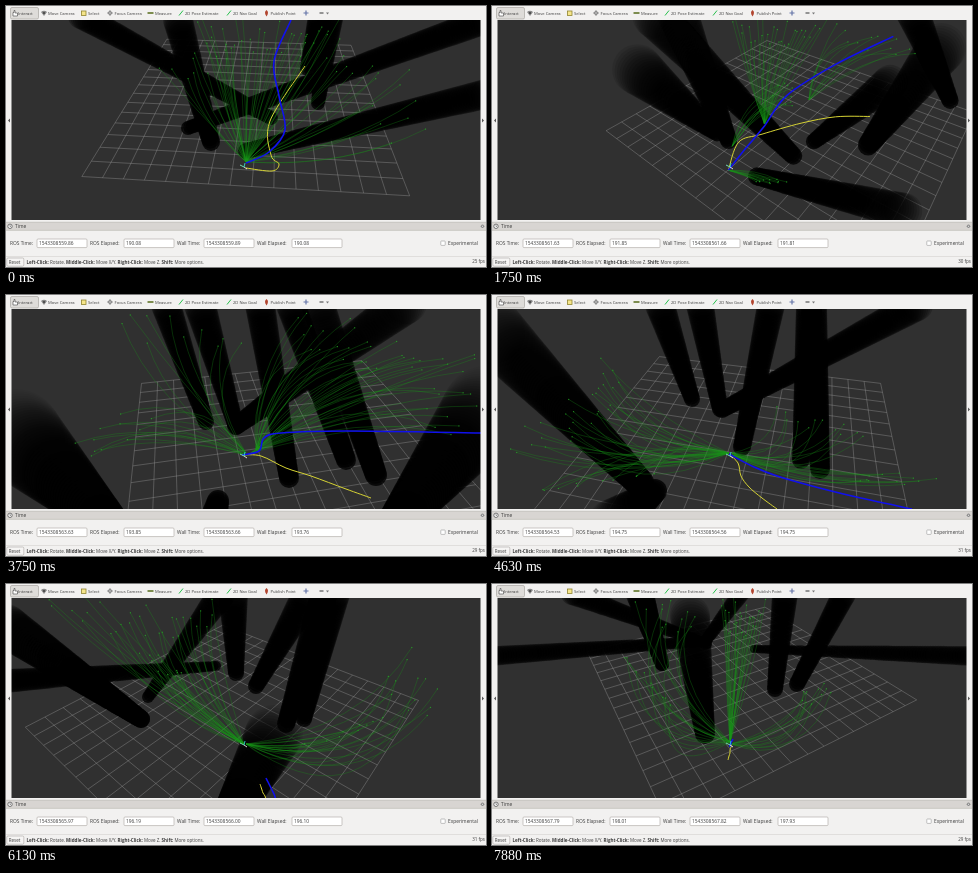
Animation, 480 px wide and 261 px high, one loop 8010 ms. Source, as an HTML page with a canvas:

```html
<!DOCTYPE html>
<html lang="en">
<head>
<meta charset="utf-8">
<title>Planner view</title>
<style>
html, body { margin: 0; width: 100%; height: 100%; overflow: hidden; background: #f2f1f0; }
canvas, svg { position: absolute; left: 0; top: 0; width: 100vw; height: 100vh; display: block; }
text { font-family: "Open Sans", "Noto Sans", sans-serif; font-size: 4.85px; fill: #3c3c3c; }
.tool text { font-size: 4.15px; }
.status text { font-size: 4.5px; }
.bold { font-weight: 700; }
</style>
</head>
<body>
<canvas id="view"></canvas>
<svg id="ui" viewBox="0 0 480 261" preserveAspectRatio="none">
  <path fill="#f2f1f0" d="M0 0H480V14H0ZM0 14H5.5V214H0ZM474.5 14H480V214H474.5ZM0 214H480V261H0Z"/>
  <path fill="#555" d="M4 112.500V116.500L2 114.500ZM476 112.500V116.500L478 114.500Z"/>
  <g class="tool">
    <rect x="4.500" y="1.500" width="28" height="11.500" rx="1.500" fill="#dedcd9" stroke="#aaa7a3" stroke-width=".7"/>
    <path d="M7 10V6.500H8V4.500H9V7H11.500V10Z" fill="#fff" stroke="#444" stroke-width=".6"/>
    <path d="M35 6Q38 3.500 41 6L38 10Z" fill="#888"/><circle cx="38" cy="7" r="1.100" fill="#444"/>
    <rect x="75.500" y="5" width="4.500" height="4.500" fill="#f5e58a" stroke="#8f8430" stroke-width=".8"/>
    <path d="M104 4V10M101 7H107" stroke="#777" stroke-width=".7"/><circle cx="104" cy="7" r="1.700" fill="none" stroke="#777" stroke-width=".7"/>
    <path d="M141.500 7H147.500" stroke="#7c8c4e" stroke-width="2"/>
    <path d="M173 9.500L177 4.500M221 9.500L225 4.500" stroke="#26c04c" stroke-width="1"/>
    <path d="M260.500 10.500Q257.500 6 260.500 4Q263.500 6 260.500 10.500" fill="#b2452f"/>
    <path d="M300 4.500V9.500M297.500 7H302.500" stroke="#6475a8" stroke-width="1.200"/>
    <path d="M313.500 7H317.500" stroke="#555" stroke-width="1.200"/>
    <path d="M320 6.500H323L321.500 8.500Z" fill="#777"/>
    <text x="12" y="8.700">Interact</text><text x="42" y="8.700">Move Camera</text>
    <text x="82" y="8.700">Select</text><text x="108.500" y="8.700">Focus Camera</text>
    <text x="149" y="8.700">Measure</text><text x="179" y="8.700">2D Pose Estimate</text>
    <text x="227" y="8.700">2D Nav Goal</text><text x="264.500" y="8.700">Publish Point</text>
  </g>
  <rect x="0" y="216" width="480" height="8.500" fill="#d8d5d2"/>
  <path d="M0 216.200H480M0 224.300H480" stroke="#bbb7b3" stroke-width=".6"/>
  <circle cx="4" cy="220.300" r="2.200" fill="#f8f8f8" stroke="#444" stroke-width=".7"/>
  <path d="M4 218.900V220.500H5" fill="none" stroke="#444" stroke-width=".5"/>
  <text x="9" y="222.200">Time</text>
  <circle cx="476.500" cy="220.300" r="1.800" fill="#888"/>
  <path d="M475.700 219.500L477.300 221.100M477.300 219.500L475.700 221.100" stroke="#fff" stroke-width=".5"/>
  <g id="fields"></g>
  <rect x="434.800" y="235" width="4.400" height="4.400" rx=".6" fill="#fff" stroke="#999" stroke-width=".6"/>
  <text x="442" y="239.200">Experimental</text>
  <path d="M0 250.500H480" stroke="#d5d2cf" stroke-width=".6"/>
  <g class="status">
    <rect x=".8" y="252" width="17" height="8.200" rx="1.200" fill="#f6f5f4" stroke="#aaa7a3" stroke-width=".6"/>
    <text x="2.800" y="257.800">Reset</text>
    <text x="20.500" y="257.800"><tspan class="bold">Left-Click:</tspan> Rotate. <tspan class="bold">Middle-Click:</tspan> Move X/Y. <tspan class="bold">Right-Click:</tspan> Move Z. <tspan class="bold">Shift:</tspan> More options.</text>
    <text id="fps" x="479" y="257.300" text-anchor="end"></text>
  </g>
</svg>
<script>
const LOOP = 8010, STEP = 125, LAST = 63;
const canvas = document.getElementById("view"), ctx = canvas.getContext("2d");
const fpsText = document.getElementById("fps");
const poses = [];

// grid: centre x, centre depth, turn in degrees
// poles: foot x, y, radius, far end x, y, radius
// fans: start, first tip, last tip, bend
function pose(at, clock, fps, grid, poles, fans, blue, yellow) {
  poses.push({ at, fps, data: { clock, grid, poles, fans, blue, yellow } });
}

pose(0, [559.86, 190.08, 559.89, 190.08], 25, [.019, 1.77, 4.3], [
  205,136,9, 172,14,15,  265,112,7, 75,10,13,  240,145,8, 480,88,15,
  312,97,7, 325,8,13,  182,122,7, 480,14,14,  302,62,8, 314,10,12,
  -40,100,8, -200,90,20,  -60,60,8, -200,20,14,  -60,180,10, -200,120,20
], [
  240,156,185,8,340,8,0,  240,156,150,60,230,20,-10,
  240,156,380,40,440,130,15,  240,156,300,14,380,40,10
], [240,157, 263,146, 279,124, 273,90, 268,55, 285,14],
   [240,162, 266,165, 273,158, 265,149, 264,115, 299,60]);

pose(9, [561.01, 191.23, 561.02, 191.23], 30, [.227, 1.711, 26.4], [
  223,134,9, 196,10,21,  265,118,8, 100,10,20,  280,169,9, 480,186,17,
  358,105,9, 420,10,22,  250,125,7, 480,131,14,  500,50,8, 520,0,14,
  225,112,8, 0,108,23,  -60,60,8, -200,20,14,  -60,180,10, -200,120,20
], [
  247,118,215,10,310,10,-8,  247,118,340,20,437,68,-35,
  240,162,370,200,410,170,-12,  247,118,150,14,210,14,-20
], [240,162, 246,140, 248,117, 270,78, 300,45, 340,14],
   [240,162, 248,118, 270,105, 300,84, 330,74, 357,75]);

pose(20, [562.38, 192.60, 562.42, 192.51], 25, [.257, 1.433, 57.5], [
  253,135,8, 175,10,20,  345,188,10, 237,10,24,  247,172,9, 330,228,20,
  398,180,12, 485,80,28,  408,148,9, 300,10,21,  408,148,9, 300,10,21,
  225,146,8, 320,10,28,  -60,60,8, -200,20,14,  -60,220,20, -200,120,45
], [
  303,118,262,10,375,10,0,  401,65,350,10,450,10,0,
  232,167,140,150,175,185,10,  232,167,455,140,450,175,-8
], [232,167, 262,146, 300,126, 325,103, 395,75, 475,50],
   [232,167, 245,158, 270,156, 320,157, 360,155, 403,153]);

pose(30, [563.63, 193.85, 563.66, 193.76], 29, [.14, 1.369, 79.1], [
  200,127,8, 160,10,15,  283,183,10, 254,10,15,  212,206,11, 205,235,16,
  385,235,18, 480,115,44,  370,180,11, 312,10,17,  340,165,10, 285,10,15,
  230,131,9, 400,8,21,  230,132,8, 194,10,16,  110,235,18, 10,140,46
], [
  250,155,290,14,475,60,-25,  245,158,475,60,475,140,-30,
  240,160,60,165,110,110,30,  240,158,90,14,235,14,-25
], [236,160, 253,156, 258,143, 275,138, 340,136, 476,138],
   [236,160, 255,161, 280,173, 305,181, 340,194, 365,203]);

pose(37, [564.53, 194.75, 564.56, 194.75], 31, [.023, 1.392, 103.1], [
  200,104,8, 168,10,15,  250,152,9, 279,10,14,  163,196,12, 120,228,24,
  330,270,20, 420,330,40,  328,174,10, 322,10,13,  309,165,9, 317,10,13,
  230,115,8, 425,10,16,  228,114,8, 208,10,14,  148,188,14, 0,35,32
], [
  237,158,10,160,110,60,-30,  240,158,285,110,395,140,40,
  240,160,380,190,470,185,15,  237,158,20,200,140,185,25
], [237,159, 262,172, 285,181, 320,191, 360,201, 420,214],
   [237,159, 246,168, 249,181, 257,192, 270,203, 285,214]);

pose(49, [565.97, 196.19, 566, 196.10], 31, [-.056, 1.505, 129.1], [
  230,89,8, 227,10,15,  280,140,9, 318,10,14,  135,135,9, 0,42,22,
  228,225,19, 268,150,29,  298,135,8, 330,10,14,  210,82,5, 0,97,12,
  250,102,8, 302,10,16,  142,113,6, 215,10,14,  135,135,9, 0,42,22
], [
  238,160,30,14,210,14,-18,  240,160,410,60,450,130,70,
  238,160,170,80,120,60,-15,  240,160,300,165,420,125,20
], [260,194, 262,198, 264,202, 266,206, 268,210, 270,216],
   [254,200, 255,203, 256,206, 257,209, 259,212, 260,216]);

pose(63, [567.79, 198.01, 567.82, 197.93], 29, [.01, 1.758, 149.5], [
  283,105,8, 293,10,13,  305,100,8, 352,10,12,  170,80,7, 148,10,14,
  213,150,10, 198,32,20,  262,65,4, 480,72,10,  215,60,5, 80,10,11,
  215,55,6, 250,8,9,  215,57,5, 0,72,10,  170,80,7, 148,10,14
], [
  238,158,228,14,275,14,0,  238,158,140,14,200,14,-60,
  238,160,320,100,350,105,35,  238,158,120,60,160,110,-45
], [238,163, 238,161, 239,160, 239,158, 240,157, 241,155],
   [239,160, 239,163, 238,166, 238,169, 237,172, 236,176]);

const mix = (a, b, u) => a + (b - a) * u;
const rnd = i => { const v = Math.sin(i * 127.1 + 11.7) * 43758.5453; return v - Math.floor(v); };

function poseAt(n) {
  let i = 0;
  while (i < poses.length - 2 && poses[i + 1].at <= n) i++;
  const a = poses[i], b = poses[i + 1], u = (n - a.at) / (b.at - a.at), out = {};
  for (const k in a.data) out[k] = a.data[k].map((v, j) => mix(v, b.data[k][j], u));
  out.fps = u < 1 ? a.fps : b.fps;
  return out;
}

// Ground plane to screen, with the camera at a fixed pitch
function project(x, z) {
  const s = 415.6 / z;
  return [241 + x * s * 1.006, s - 147];
}

function drawGrid([cx, cz, deg]) {
  const cells = 15, c = Math.cos(deg * Math.PI / 180), s = Math.sin(deg * Math.PI / 180);
  const spot = (u, v) => project(cx + u * c + v * s, cz - u * s + v * c);
  ctx.beginPath();
  for (let i = 0; i <= cells; i++) {
    const k = i / cells - .5;
    ctx.moveTo(...spot(k, -.5)); ctx.lineTo(...spot(k, .5));
    ctx.moveTo(...spot(-.5, k)); ctx.lineTo(...spot(.5, k));
  }
  ctx.strokeStyle = "rgba(165,165,165,.55)";
  ctx.lineWidth = .65;
  ctx.stroke();
}

// A pole is a stack of discs that fade as they near the camera
function drawPole([x0, y0, r0, x1, y1, r1]) {
  const count = Math.ceil(Math.hypot(x1 - x0, y1 - y0) / 2.6);
  const far = .32 * Math.min(1, Math.pow(12 / r1, 1.6));
  for (let i = count; i >= 0; i--) {
    const u = i / count;
    ctx.fillStyle = `rgba(0,0,0,${mix(.8, far, Math.sqrt(u))})`;
    ctx.beginPath();
    ctx.arc(mix(x0, x1, u), mix(y0, y1, u), mix(r0, r1, u), 0, 7);
    ctx.fill();
  }
}

function drawFan([x, y, ax, ay, bx, by, bend], count, seed) {
  ctx.strokeStyle = "rgba(24,150,24,.55)";
  ctx.fillStyle = "rgba(40,180,40,.7)";
  ctx.lineWidth = .55;
  for (let i = 0; i < count; i++) {
    const r = rnd(seed + i), q = rnd(seed + i + 50), u = (i + r) / count;
    const reach = mix(.72, 1.04, q);
    const ex = mix(x, mix(ax, bx, u), reach), ey = mix(y, mix(ay, by, u), reach);
    const dx = ex - x, dy = ey - y, len = Math.hypot(dx, dy) || 1;
    const off = bend * (.4 + 1.2 * r) + (q - .5) * len * .12;
    ctx.beginPath();
    ctx.moveTo(x, y);
    ctx.quadraticCurveTo(x + dx * .55 - dy / len * off, y + dy * .55 + dx / len * off, ex, ey);
    ctx.stroke();
    ctx.fillRect(ex - .6, ey - .6, 1.2, 1.2);
  }
}

function drawPath(p, color, width) {
  const at = i => { const k = Math.max(0, Math.min(p.length / 2 - 1, i)) * 2; return [p[k], p[k + 1]]; };
  ctx.beginPath();
  ctx.moveTo(p[0], p[1]);
  for (let i = 0; i < p.length / 2 - 1; i++) {
    const [a, b, c, d] = [at(i - 1), at(i), at(i + 1), at(i + 2)];
    ctx.bezierCurveTo(b[0] + (c[0] - a[0]) / 6, b[1] + (c[1] - a[1]) / 6,
      c[0] - (d[0] - b[0]) / 6, c[1] - (d[1] - b[1]) / 6, c[0], c[1]);
  }
  ctx.strokeStyle = color;
  ctx.lineWidth = width;
  ctx.stroke();
}

function drawRobot() {
  ctx.lineWidth = .9;
  for (const [color, dx, dy] of [["#7df0c0", -4, -2], ["#e8f0e8", 3, 2], ["#35d8d0", 1, -4]]) {
    ctx.strokeStyle = color;
    ctx.beginPath(); ctx.moveTo(238, 161); ctx.lineTo(238 + dx, 161 + dy); ctx.stroke();
  }
}

const slices = (list, size) =>
  Array.from({ length: list.length / size }, (_, i) => list.slice(i * size, i * size + size));

const fields = [["ROS Time:", 4, 31], ["ROS Elapsed:", 84, 118], ["Wall Time:", 171, 198], ["Wall Elapsed:", 251, 286]];
document.getElementById("fields").innerHTML = fields.map(([label, x, box]) =>
  `<text x="${x}" y="239.2">${label}</text>
   <rect x="${box}" y="233" width="50" height="8.600" rx="1" fill="#fff" stroke="#b5b1ad" stroke-width=".7"/>
   <text class="value" x="${box + 2}" y="239.2"></text>`).join("");
const values = document.querySelectorAll(".value");

function draw(n) {
  const p = poseAt(n), dpr = window.devicePixelRatio || 1;
  const w = Math.round(innerWidth * dpr), h = Math.round(innerHeight * dpr);
  if (canvas.width !== w || canvas.height !== h) { canvas.width = w; canvas.height = h; }
  ctx.setTransform(w / 480, 0, 0, h / 261, 0, 0);
  ctx.fillStyle = "#303030";
  ctx.fillRect(0, 0, 480, 261);
  drawGrid(p.grid);
  slices(p.poles, 6).forEach(drawPole);
  slices(p.fans, 7).forEach((fan, i) => drawFan(fan, [28, 12, 11, 10][i], i * 100));
  drawPath(p.yellow, "#d6d334", 1);
  drawPath(p.blue, "#1010ee", 1.6);
  drawRobot();
  p.clock.forEach((v, i) => {
    values[i].textContent = i % 2 ? v.toFixed(2) : "1543308" + v.toFixed(2);
  });
  fpsText.textContent = p.fps + " fps";
}

function tick(now) {
  const t = now % LOOP;
  let n = Math.min(LAST, Math.floor(t / STEP));
  if (t < Math.round(n * STEP / 10) * 10) n--;
  draw(n);
  requestAnimationFrame(tick);
}
draw(0);
requestAnimationFrame(tick);
</script>
</body>
</html>
```
